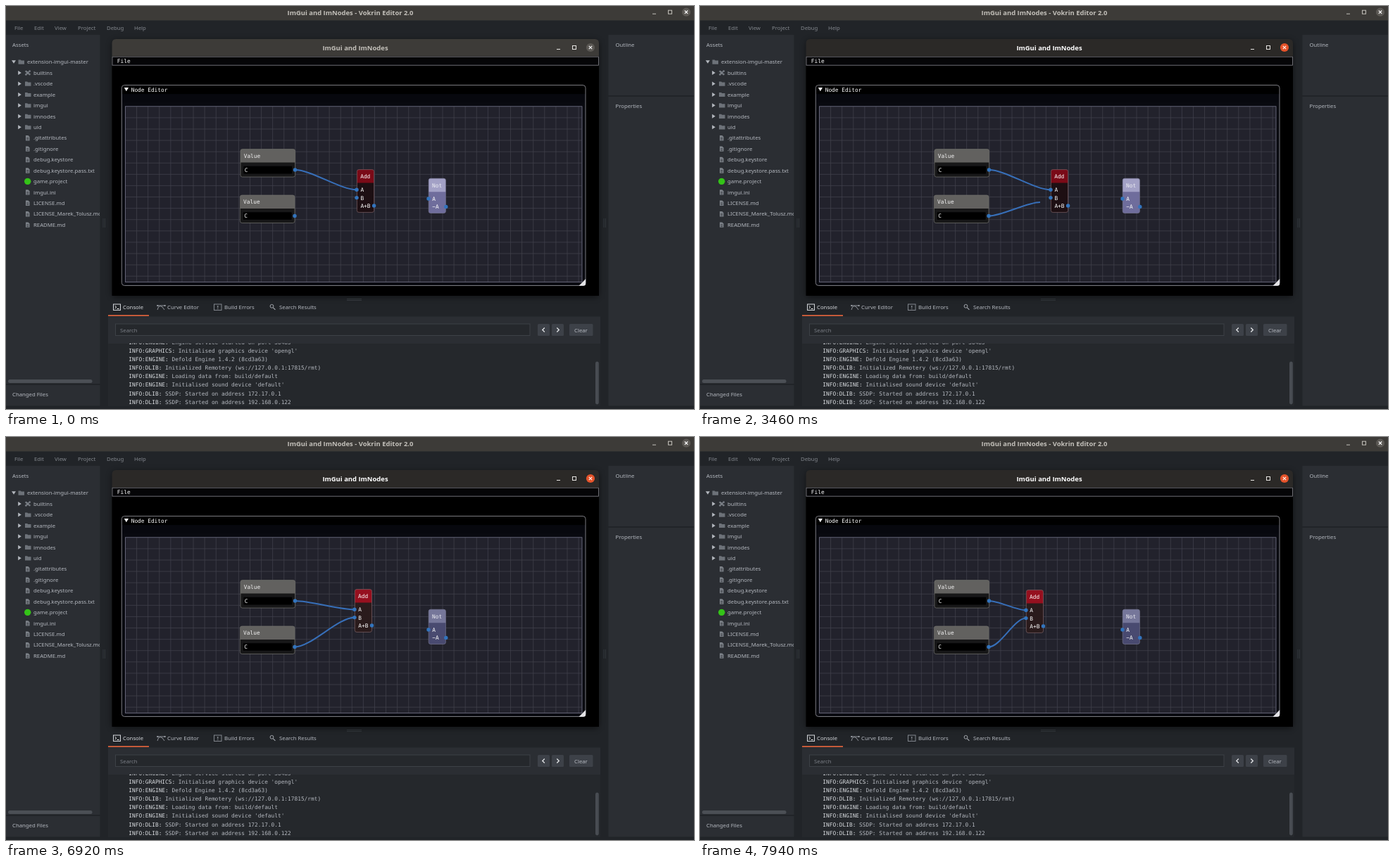
Recreate the animation shown at these times as an HTML page. Size 977x573 px, loop 8 s.

```html
<!DOCTYPE html>
<html lang="en">
<head>
<meta charset="utf-8">
<title>Node editor</title>
<style>
html, body { margin: 0; width: 100%; height: 100%; overflow: hidden; background: #212428; }
svg { display: block; width: 977px; height: 573px; }
text { white-space: pre; }
.ui { font: 7.75px "Noto Sans", sans-serif; }
.mono { font: 7.82px "DejaVu Sans Mono", monospace; }
.bold { font: bold 9.45px "Open Sans", sans-serif; text-anchor: middle; }
</style>
</head>
<body>
<svg id="stage" viewBox="0 0 977 573" xmlns="http://www.w3.org/2000/svg"></svg>
<script>
const LOOP = 8000;
const TEXT = '#b4b8bf', DIM = '#83878d', PANEL = '#2b2e33', BACK = '#212428';
const LINK = '#376fb9', PIN = '#3274bd', HOT = '#3596fa';

const rect = (x, y, w, h, fill, more = '') =>
  `<rect x="${x}" y="${y}" width="${w}" height="${h}" fill="${fill}" ${more}/>`;
const path = (d, fill = 'none', more = '') => `<path d="${d}" fill="${fill}" ${more}/>`;
const line = (d, color, width = 1, more = '') =>
  path(d, 'none', `stroke="${color}" stroke-width="${width}" ${more}`);
const dot = (x, y, r, fill, more = '') => `<circle cx="${x}" cy="${y}" r="${r}" fill="${fill}" ${more}/>`;
const text = (x, y, s, fill = TEXT, cls = 'ui') =>
  `<text x="${x}" y="${y}" fill="${fill}" class="${cls}">${s}</text>`;
const code = (x, y, s, fill = '#fff') => text(x, y, s, fill, 'mono');

function controls(x, y, color, disc, id) {
  return line(`M${x - 48} ${y + 2.5}h5`, color, 1) +
    rect(x - 25.5, y - 2.5, 5, 5, 'none', `stroke="${color}"`) +
    dot(x, y, 6.1, disc, id ? `id="${id}"` : '') +
    line(`M${x - 2.2} ${y - 2.2}l4.4 4.4m0 -4.4l-4.4 4.4`, '#fff', 1.1);
}

const icons = {
  folder: (x, y) => path(`M${x} ${y - 3}h3.2l1 1h4.3v5.2h-8.5z`, '#6d7279'),
  file: (x, y) => path(`M${x + 1} ${y - 3.6}h3.5l2 2v5.4h-5.5z`, '#7d8289') +
    line(`M${x + 2.2} ${y - .4}h3m-3 1.4h3m-3 1.4h3`, PANEL, .6),
  puzzle: (x, y) => rect(x + 1.8, y - 2, 4, 4, '#767b82') +
    [[1.4, 2.4], [6.6, -2.4], [1.6, -2], [6.4, 2]]
      .map(([dx, dy]) => dot(x + dx, y + dy, 1.4, '#767b82')).join(''),
  game: (x, y) => dot(x + 3.7, y, 4.7, '#34c318')
};

function tree() {
  const rows = [['puzzle', 'builtins'], ['folder', '.vscode'], ['folder', 'example'], ['folder', 'imgui'],
    ['folder', 'imnodes'], ['folder', 'uid'], ['file', '.gitattributes'], ['file', '.gitignore'],
    ['file', 'debug.keystore'], ['file', 'debug.keystore.pass.txt'], ['game', 'game.project'],
    ['file', 'imgui.ini'], ['file', 'LICENSE.md'], ['file', 'LICENSE_Marek_Tolusz.md'], ['file', 'README.md']];
  let s = path('M8 77.3h6l-3 4.4z', TEXT) + icons.folder(17.5, 79.6) + text(30, 82.4, 'extension-imgui-master');
  rows.forEach(([kind, name], i) => {
    const y = 79.6 + 15.43 * (i + 1);
    if (i < 6) s += path(`M17.2 ${y - 3}v6l4.6 -3z`, TEXT);
    s += icons[kind](27, y) + text(39, y + 2.8, name);
  });
  return `<g clip-path="url(#left)">${s}</g>`;
}

function editor() {
  const grip = (x, y) => line(`M${x - 1} ${y}v13m2.4 -13v13`, '#33373c', 1);
  let s = rect(0, 0, 977, 573, BACK) + rect(0, 0, 977, 20.5, '#3d3b38') +
    text(489, 12.8, 'ImGui and ImNodes - Vokrin Editor 2.0', '#c3c0ba', 'bold') +
    controls(966, 8.7, '#c3c0ba', '#5b5854');
  [[12, 'File'], [40, 'Edit'], [69, 'View'], [102, 'Project'], [143, 'Debug'], [182, 'Help']]
    .forEach(([x, name]) => s += text(x, 34, name, DIM));
  s += rect(0, 41, 133.5, 496, PANEL) + rect(0, 539, 133.5, 29.5, PANEL) +
    rect(855.5, 41, 121.5, 86, PANEL) + rect(855.5, 129, 121.5, 439.5, PANEL) +
    text(9, 57.6, 'Assets') + text(9, 555, 'Changed Files') +
    text(865.5, 57.6, 'Outline') + text(865.5, 145.4, 'Properties') +
    tree() + rect(3, 531, 119.5, 5, '#4b4f55', 'rx="2.5"') +
    grip(139, 302) + grip(850, 302);
  return s;
}

function consolePane() {
  const log = [['ENGINE', 'Engine service started on port 38485'],
    ['GRAPHICS', "Initialised graphics device 'opengl'"],
    ['ENGINE', 'Defold Engine 1.4.2 (8cd3a63)'],
    ['DLIB', 'Initialized Remotery (ws://127.0.0.1:17815/rmt)'],
    ['ENGINE', 'Loading data from: build/default'],
    ['ENGINE', "Initialised sound device 'default'"],
    ['DLIB', 'SSDP: Started on address 172.17.0.1'],
    ['DLIB', 'SSDP: Started on address 192.168.0.122']];
  const rows = log.map(([tag, msg], i) =>
    code(174.3, 481.2 + 12.05 * i, `<tspan fill="#d9dce0">INFO:${tag}:</tspan> ${msg}`, TEXT)).join('');
  const button = (x, w) => rect(x, 452, w, 17, '#3d4148', 'rx="1.5"');
  return rect(145, 441.5, 699, 127, PANEL) + rect(145, 480, 699, 88.5, '#25282c') +
    line('M484 416.5h21m-21 2h21', '#3a3e43', 1, 'id="split"') +
    rect(145, 439.3, 58, 1.7, '#e0633c') +
    rect(152.5, 424, 10, 8.5, 'none', 'stroke="#d5d8dc"') +
    line('M154.7 426.3l2 1.9l-2 1.9m3 .4h2.8', '#fff', 1) + text(166, 430.9, 'Console', '#d5d8dc') +
    line('M215 432q1 -5.5 4 -5.5q3 0 6 5.5M215 426h11', '#9a9ea5', .9) +
    rect(214.3, 425, 2, 2, '#9a9ea5') + rect(224.6, 425, 2, 2, '#9a9ea5') +
    text(229, 430.9, 'Curve Editor') +
    rect(295.5, 424, 10.5, 8.5, 'none', 'stroke="#82868d"') + line('M300.8 426v3m0 1v1', '#a6aab0', 1) +
    text(310, 430.9, 'Build Errors') +
    dot(377.5, 426.8, 2.4, 'none', 'stroke="#a6aab0"') + line('M379.4 428.8l3 3', '#a6aab0', 1.2) +
    text(388, 430.9, 'Search Results') +
    rect(155.5, 452, 588.5, 16.5, '#25282c', 'stroke="#3d4147"') + text(162, 463.6, 'Search', '#7b7f87') +
    button(755, 17) + button(775, 17) + button(800, 33.5) +
    line('M764.8 457.5l-3 3l3 3M782.3 457.5l3 3l-3 3', '#e4e6e9', 1.3) +
    text(807, 463.6, 'Clear') +
    `<g clip-path="url(#log)">${rows}</g>` + rect(837, 505.5, 4.8, 61, '#484c52', 'rx="2.4"');
}

// A node box with a coloured title strip of fixed height.
function box(x, y, w, h, title, body, edge, id) {
  return rect(x, y, w, h, body, `rx="2.7" id="${id}Body"`) +
    path(`M${x} ${y + 19}v-16.3q0 -2.7 2.7 -2.7h${w - 5.4}q2.7 0 2.7 2.7v16.3z`, title, `id="${id}Title"`) +
    rect(x, y, w, h, 'none', `rx="2.7" stroke="${edge}" stroke-width=".7"`);
}
const value = (x, y, id) => box(x, y, 77.6, 39.5, '#62615f', '#171718', '#73736f', id) +
  code(x + 4.7, y + 12.2, 'Value', '#f2f2f2') + rect(x + 4.3, y + 24.2, 69, 10.6, '#000', 'rx="1"') +
  code(x + 5.8, y + 32.2, 'C');
const pin = (x, y, id = '') => dot(x, y, 2.7, PIN, id && `id="${id}"`);

function gameWindow() {
  let grid = '';
  const step = 16.09;
  for (let i = 1; i <= 40; i++) grid += `M${(169.5 + i * step).toFixed(2)} 143V392`;
  for (let i = 1; i <= 15; i++) grid += `M170 ${(142.8 + i * step).toFixed(2)}H817.5`;
  return rect(150.5, 49, 691.5, 365, '#000', 'rx="6" opacity=".5" filter="url(#soft)"') +
    path('M150.5 72V53q0 -6 6 -6h679.5q6 0 6 6V72z', '#3d3b38', 'id="bar"') +
    `<g id="caption">${text(496, 62.8, 'ImGui and ImNodes', '#c3c0ba', 'bold')}</g>` +
    controls(830, 59, '#e8e6e3', '#5b5854', 'close') +
    rect(150.5, 71.5, 691.5, 340.5, '#000') +
    rect(151, 72.2, 690.5, 12, '#050507', 'stroke="#88888f" stroke-width=".8"') + code(157.8, 81, 'File') +
    rect(164.3, 112.5, 658.7, 285, '#090a10', 'rx="4"') +
    path('M164.3 125.3v-8.8q0 -4 4 -4h650.7q4 0 4 4v8.8z', '#000') +
    rect(165, 125.3, 657.5, 12, '#07080e') +
    rect(164.3, 112.5, 658.7, 285, 'none', 'rx="4" stroke="#98989f" stroke-width=".8"') +
    path('M167.8 116h6.2l-3.1 5.2z', '#fff') + code(177.7, 121.5, 'Node Editor') +
    path('M813.5 397.7l9.7 -9.7v6.7q0 3 -3 3z', '#e3e3e6') +
    rect(169.5, 142.8, 648.5, 249.7, '#22222c') + line(grid, '#42424d', .75) +
    rect(169.5, 142.8, 648.5, 249.7, 'none', 'stroke="#7d7d93" stroke-width=".75"') +
    line('', LINK, 2.03, 'id="linkA"') + line('', LINK, 2.03, 'id="linkB"') +
    value(333, 203.6, 'v1') + pin(410.5, 233) +
    value(332.4, 269, 'v2') + pin(410, 298.5, 'outPin') +
    box(600.2, 245.2, 24.2, 49.3, '#a3a1c6', '#6f6d9c', '#75758f', 'not') +
    code(605, 257.6, 'Not', '#ececf2') + code(605.2, 276.7, 'A') + code(605.2, 288.2, '~A') +
    pin(600, 274) + pin(624.8, 285.4) +
    `<g id="add">${box(0, 0, 24.2, 60.8, '#7a0a17', '#1d0f13', '#7d6468', 'add')}
      ${code(4.8, 12.1, 'Add') + code(5, 31.6, 'A') + code(5, 43, 'B') + code(5, 54.4, 'A+B')}
      ${pin(-.4, 28.7) + pin(-.4, 40, 'inPin') + pin(24.2, 51.4)}</g>`;
}

document.getElementById('stage').innerHTML =
  `<defs><clipPath id="left"><rect y="41" width="133" height="490"/></clipPath>
   <clipPath id="log"><rect x="145" y="479.4" width="690" height="89.1"/></clipPath>
   <filter id="soft" x="-5%" y="-10%" width="110%" height="120%"><feGaussianBlur stdDeviation="4.5"/></filter></defs>` +
  editor() + consolePane() + gameWindow();

const $ = id => document.getElementById(id);
const set = (id, name, val) => $(id).setAttribute(name, val);

// Smooth curve through [time, x, y] keys that never overshoots.
function follow(keys, t) {
  const last = keys.length - 1;
  if (t <= keys[0][0]) return keys[0].slice(1);
  if (t >= keys[last][0]) return keys[last].slice(1);
  const i = keys.findIndex(k => k[0] > t) - 1;
  const span = keys[i + 1][0] - keys[i][0], u = (t - keys[i][0]) / span;
  return [1, 2].map(c => {
    const slope = j => (keys[j + 1][c] - keys[j][c]) / (keys[j + 1][0] - keys[j][0]);
    const tangent = j => {
      if (j === 0 || j === last) return 0;
      const a = slope(j - 1), b = slope(j);
      return a * b <= 0 ? 0 : 2 * a * b / (a + b);
    };
    const a = keys[i][c], b = keys[i + 1][c], v = u * u * (3 - 2 * u);
    return a + (b - a) * v + span * u * (1 - u) * ((1 - u) * tangent(i) - u * tangent(i + 1));
  });
}

const wire = (x1, y1, x2, y2) => {
  const k = Math.hypot(x2 - x1, y2 - y1) / 4;
  return `M${x1} ${y1}C${x1 + k} ${y1} ${x2 - k} ${y2} ${x2} ${y2}`;
};

const dragKeys = [[1860, 410, 298.5], [2240, 437, 295], [2620, 462, 289.3], [2720, 462, 289.3],
  [3100, 474, 283], [3460, 483, 278.9], [3820, 483, 278.9], [3980, 493, 275]];
const nodeKeys = [[6660, 498.4, 232.6], [6880, 496, 219], [7100, 490.9, 207.7], [7300, 483, 204],
  [7480, 476, 203.9], [7620, 471.4, 204.4], [7940, 463.3, 217.6]];

function draw(t) {
  const focused = t >= 1460;
  set('bar', 'fill', focused ? '#2b2927' : '#3d3b38');
  set('close', 'fill', focused ? '#e5532a' : '#5b5854');
  set('split', 'opacity', focused ? .75 : 1);
  $('caption').firstElementChild.setAttribute('fill', focused ? '#fff' : '#c3c0ba');

  const [x, y] = follow(nodeKeys, t);
  set('add', 'transform', `translate(${x} ${y})`);
  set('linkA', 'd', wire(410.5, 233, x - .4, y + 28.7));

  const snapped = t >= 3940;
  const [ex, ey] = snapped ? [x - .4, y + 40] : follow(dragKeys, t);
  set('linkB', 'd', t > 1870 ? wire(410, 298.5, ex, ey) : '');
  set('outPin', 'fill', t >= 500 && ex < 417 ? HOT : PIN);
  set('inPin', 'fill', snapped && t < 5520 ? HOT : PIN);

  const hover = t >= 5520, picked = t >= 6520;
  set('addTitle', 'fill', picked ? '#96101f' : hover ? '#8c0d1b' : '#7a0a17');
  set('addBody', 'fill', picked ? '#2a1b1c' : hover ? '#27181a' : '#1d0f13');
  set('notTitle', 'fill', picked ? '#76779a' : '#a3a1c6');
  set('notBody', 'fill', picked ? '#494a70' : '#6f6d9c');
}

const start = performance.now();
function tick() {
  draw((performance.now() - start) % LOOP);
  requestAnimationFrame(tick);
}
tick();
</script>
</body>
</html>
```
